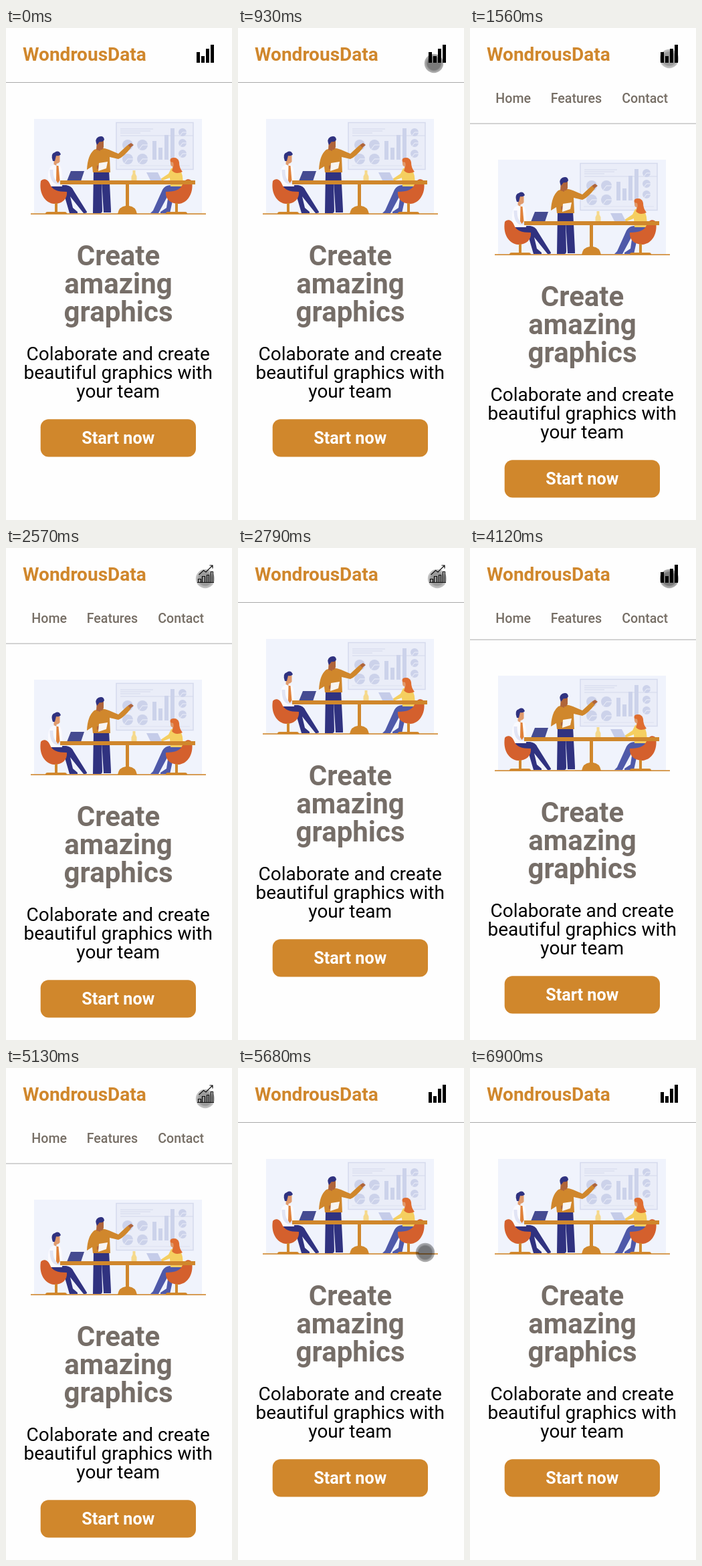
An HTML page for the animation above (7.13 s loop, 338 by 736 pixels).

```html
<!DOCTYPE html>
<html lang="en">
<head>
<meta charset="utf-8">
<title>Landing page</title>
<style>
html, body { margin: 0; width: 100%; height: 100%; overflow: hidden; background: #fefefe; }
svg { display: block; width: 100%; height: 100%; font-family: Roboto, sans-serif; }
.mid { text-anchor: middle; }
.logo { font-size: 28px; font-weight: 700; fill: #d0872c; }
.menu { font-size: 19.6px; font-weight: 500; fill: #766e65; }
.title { font-size: 42px; font-weight: 700; fill: #766e68; }
.lead { font-size: 28px; fill: #000; }
.btn { font-size: 25.2px; font-weight: 700; fill: #fff; }
.navy { fill: #303280; }
.gold { fill: #d0872c; }
.red { fill: #d4602d; }
.skin { fill: #b0653a; }
.light { fill: #e09a6c; }
.pale { fill: #ccd2ea; }
</style>
</head>
<body>
<svg viewBox="0 0 338 736">
  <defs>
    <clipPath id="clip"><rect id="reveal" y="82" width="338" height="0"/></clipPath>
    <radialGradient id="touch">
      <stop offset=".68" stop-color="#000" stop-opacity=".52"/>
      <stop offset=".84" stop-color="#000" stop-opacity=".36"/>
      <stop offset="1" stop-color="#000" stop-opacity=".3"/>
    </radialGradient>
    <g id="chair" class="red">
      <path d="M52 229C56 224 63 226 66 234C69 242 77 245 91 245C92 256 84 263 72 263C58 262 49 247 52 229Z"/>
      <path d="M73 262h4v13h11q3 0 3 3H59q0-3 3-3h11Z" class="gold"/>
    </g>
  </defs>

  <text class="logo" x="25" y="49">WondrousData</text>
  <g class="menu" clip-path="url(#clip)">
    <text x="38.300" y="112">Home</text>
    <text x="120.700" y="112">Features</text>
    <text x="227.300" y="112">Contact</text>
  </g>
  <path id="solid" d="M285 36h5v16h-5ZM292 42h5v10h-5ZM299 31h5v21h-5ZM306 25h5v27h-5Z"/>
  <path id="lined" fill="none" stroke="#111" stroke-width="1.200" d="M286 51.500H311M287.500 51V46.500H291.500V51M293.500 51V42.500H297.500V51M300.500 51V40.500H303.500V51M306.500 51V35.500H309.500V51M288.500 40L295.500 33.500L299 36L308.500 26.500M304.500 26H309V30.500"/>
  <rect id="line" y="81" width="338" height="1" fill="#a9a9a9"/>

  <g id="page">
    <rect x="42" y="136" width="251" height="142" fill="#f0f3fc"/>
    <rect x="165" y="141.500" width="115" height="70" fill="#eaedf8" stroke="#d5daed" stroke-width="1.500"/>
    <path d="M171 151h49M171 154h45M171 157h30M171 161h109" stroke="#d3d8eb"/>
    <g id="pies" class="pale"></g>
    <path class="pale" d="M219 169h6v28h-6ZM228 179h6v18h-6ZM237 160h6v37h-6ZM246 150h6v47h-6Z"/>
    <path d="M170 206h105" stroke="#dde1f0"/>

    <path class="navy" d="M64 235H90Q98 236 101 243L121 275Q122 277 116 277L96 252L100 269L107 275V277H95L86 246H70Q64 243 64 235Z"/>
    <path fill="#fafaff" d="M67 207Q73 202 81 206Q85 214 84 237H65Q60 216 67 207Z"/>
    <path d="M68 212Q68 229 76 231H93" fill="none" stroke="#e1e4f5" stroke-width="5"/>
    <path fill="#e0813a" d="M75.500 206h3l2 22-3 4-2.500-4Z"/>
    <path class="light" d="M72 191h8.500v9q-2 3-5 3v3l-4-2ZM90 228h6v4h-6Z"/>
    <path class="navy" d="M70 199Q66 188 73 186Q79 182 82 189Q80 192 75 191L73 199Z"/>
    <use href="#chair"/>

    <path class="navy" d="M131 212H154L157 272V276H146L143 228L144 273Q144 277 141 277H130Z"/>
    <path class="gold" d="M132 182Q143 177 154 182L168 188L182 175L187 179Q176 193 168 196L155 193L156 216H130L129 207L121 212Q122 190 132 182Z"/>
    <path class="skin" d="M136 168h10v10q-1 5-5 4v2l-6-2ZM182 175l5-3 4 3-5 4ZM136 206l7-2 1 5-8 2Z"/>
    <path class="navy" d="M136 175Q132 166 138 163Q146 160 147 167Q145 171 140 170Z"/>
    <path fill="#f8f5f2" d="M139 202l13-2-2 10-12 4Z"/>

    <path fill="#4f59a9" d="M265 235H246Q238 235 234 242L220 273L216 277H228L243 249L240 269L231 275V277H245L251 250Q263 248 265 235Z"/>
    <path fill="#f5cf60" d="M247 210Q257 205 262 215Q266 224 264 237H246L245 224L232 229L231 226L243 218Z"/>
    <path class="light" d="M246 197h8v13l-5 1v-4q-4 0-3-10Z"/>
    <path fill="#df6d30" d="M246 200Q244 194 251 194Q258 194 259 201Q259 209 264 215Q254 220 248 213Q252 207 250 201Z"/>
    <use href="#chair" transform="matrix(-1 0 0 1 330 0)"/>

    <path fill="#454b91" d="M97 214h20l-5 15H91Z"/>
    <path fill="#c5cce9" d="M210 216h17l6 12h-17Z"/>
    <path fill="#f5d98c" d="M189.500 213h4v5l2 4v6h-8v-6l2-4Z"/>
    <path class="gold" d="M81 228H283V234H184V266Q194 267 196 278H167Q169 267 179 266V234H81Z"/>
    <rect class="gold" x="37" y="277.300" width="262" height="1.600"/>

    <g class="mid">
      <g class="title">
        <text x="168" y="355">Create</text>
        <text x="168" y="397">amazing</text>
        <text x="168" y="439">graphics</text>
      </g>
      <g class="lead">
        <text x="167.700" y="497">Colaborate and create</text>
        <text x="167.700" y="525">beautiful graphics with</text>
        <text x="167.700" y="553">your team</text>
      </g>
      <rect class="gold" x="51.700" y="585.200" width="232.300" height="56.400" rx="12"/>
      <text class="btn" x="167.700" y="622">Start now</text>
    </g>
  </g>
  <circle id="cursor" r="14.200" fill="url(#touch)"/>
</svg>
<script>
const LOOP = 7130, MENU = 61.5;
const $ = id => document.getElementById(id);

// pointer stops: time, x, y
const path = [
  [150, 290, 488], [230, 233, 203],
  [460, 231, 180], [540, 229, 145], [620, 229, 108], [690, 246, 90],
  [770, 270, 73], [850, 284, 61], [930, 293, 53], [1000, 299, 48],
  [1080, 298.5, 46.5], [1160, 298, 46],
  [5680, 280, 276], [5760, 276, 420], [5840, 288, 570], [5910, 290, 615],
  [5990, 290, 660], [6070, 292, 680], [6150, 295, 695], [6220, 298, 707],
  [6300, 301, 716], [6370, 303, 724], [6440, 305, 731.5], [6520, 317, 749.5]
];

// menu toggles: press, start, end, steps, whether the end layout flashes first
const toggles = [
  [1330, 1560, 1940, 5, true],
  [2570, 2790, 3110, 4, true],
  [3640, 3810, 4190, 5, false],
  [4880, 5130, 5520, 5, false]
];

const pie = (x, y, r) =>
  `<circle cx="${x}" cy="${y}" r="${r}"/><path d="M${x + r} ${y}H${x}L${x - r * .6} ${y + r * .8}" fill="none" stroke="#edf0fa"/>`;
let pies = "";
for (const x of [182, 204]) for (const y of [175, 196]) pies += pie(x, y, 8);
for (const y of [156, 172, 188]) pies += pie(264, y, 6);
$("pies").innerHTML = pies;

const swing = p => .5 - Math.cos(p * Math.PI) / 2;
const show = (id, on) => $(id).setAttribute("visibility", on ? "visible" : "hidden");
const move = (id, x, y) => $(id).setAttribute("transform", `translate(${x} ${y})`);

function menuOpen(t) {
  let open = 0;
  toggles.forEach(([, start, end, steps, flash], i) => {
    if (t < start) return;
    const k = Math.min(steps, Math.floor((t - start) / (end - start) * steps));
    const p = flash && k === 0 ? 1 : swing(k / steps);
    open = i % 2 ? 1 - p : p;
  });
  return open;
}

function draw(t) {
  const h = MENU * menuOpen(t);
  move("line", 0, h);
  move("page", 0, Math.floor(h)); // whole pixels keep the text crisp
  $("reveal").setAttribute("height", h);

  const lined = t >= 2090 && t < 3260 || t >= 4350 && t < 5680;
  show("lined", lined);
  show("solid", !lined);

  const at = path.filter(p => p[0] <= t).pop();
  show("cursor", at && t < 6900);
  if (at) move("cursor", at[1], at[2]);
  const tapped = toggles.some(([press, start]) => t >= press && t < start + 75);
  $("cursor").setAttribute("opacity", tapped ? .75 : 1);
}

const begin = performance.now();
function tick() {
  draw((performance.now() - begin) % LOOP);
  requestAnimationFrame(tick);
}
tick();
</script>
</body>
</html>
```
